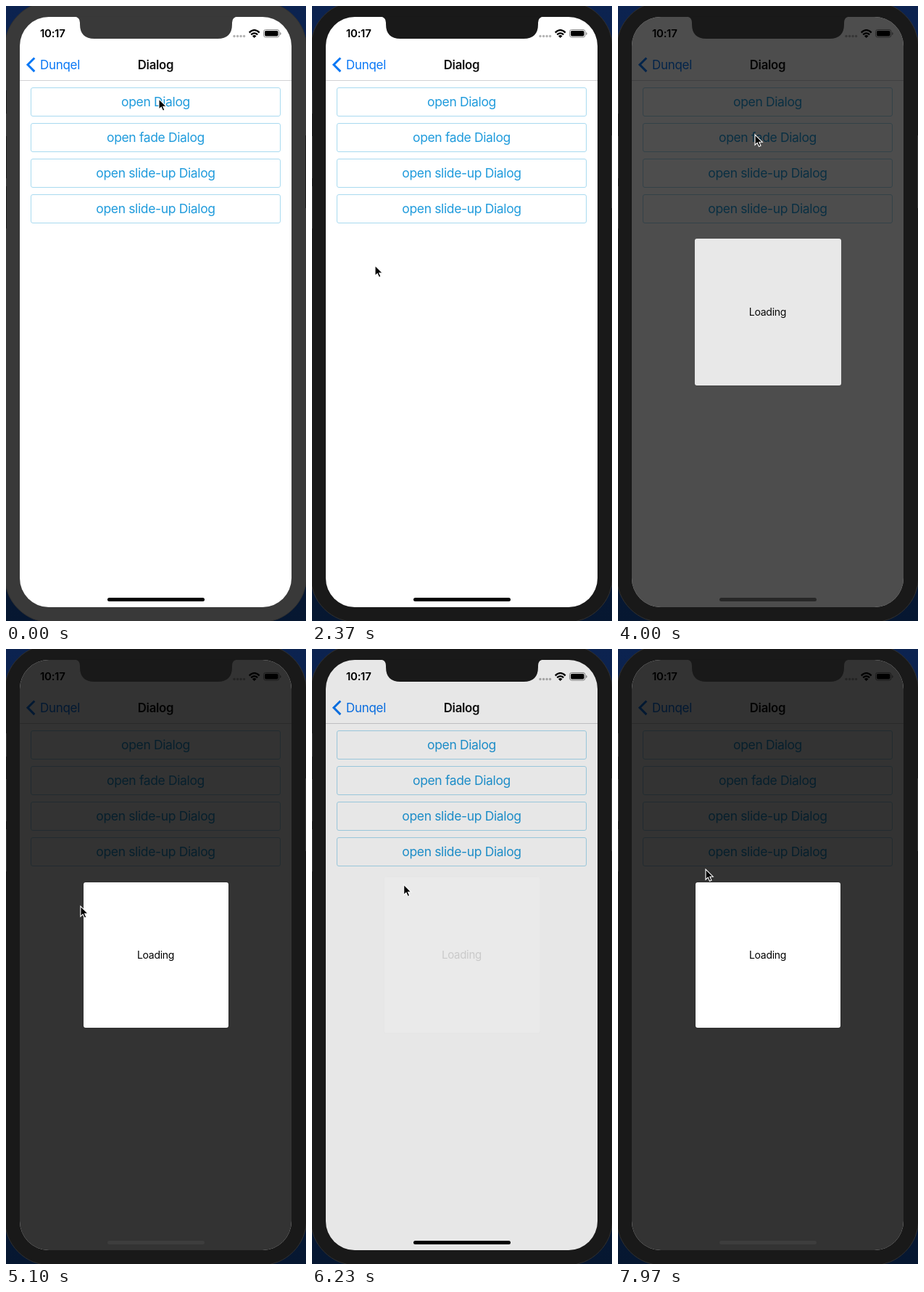
These frames come from a looping animation (414x846 px, 8 s). An HTML page:

```html
<!DOCTYPE html>
<html lang="en">
<head>
<meta charset="utf-8">
<title>Dialog demo</title>
<style>
  html, body { margin: 0; width: 100%; height: 100%; overflow: hidden; background: #0a1c40; }
  svg { display: block; width: 414px; height: 846px; }
  text { font-family: Inter, "Open Sans", sans-serif; letter-spacing: -.3px; }
  .middle { text-anchor: middle; }
  .bold { font-weight: 600; }
  #buttons rect { fill: #fff; stroke: #a9daf0; }
  #buttons text { fill: #1f9bdc; font-size: 17.5px; letter-spacing: -.36px; }
</style>
</head>
<body>
<svg viewBox="0 0 414 846">
  <defs>
    <linearGradient id="desk" x2="0" y2="1">
      <stop stop-color="#0c2350"/><stop offset="1" stop-color="#061731"/>
    </linearGradient>
    <clipPath id="screen"><rect x="19" y="15" width="375" height="812" rx="40"/></clipPath>
  </defs>
  <rect width="414" height="846" fill="url(#desk)"/>
  <rect id="bezel" x="-2" y="-6" width="417" height="854" rx="64" stroke="#303030"/>
  <path id="keys" d="M.5 116V148M.5 179V237M.5 248V306M413.5 178V278"/>

  <g clip-path="url(#screen)">
    <rect x="19" y="15" width="375" height="812" fill="#fff"/>
    <text class="bold" x="47" y="43" font-size="15">10:17</text>
    <g fill="#b4b4b4">
      <circle cx="315" cy="41.5" r="1.7"/><circle cx="319.6" cy="41.5" r="1.7"/>
      <circle cx="324.1" cy="41.5" r="1.7"/><circle cx="328.6" cy="41.5" r="1.7"/>
    </g>
    <g fill="none" stroke="#000" stroke-width="2.2">
      <path d="M335.7 36.6Q342.7 29.8 349.7 36.6M338.2 39.4Q342.7 35.2 347.2 39.4"/>
    </g>
    <path d="M342.7 44L339.9 41.2Q342.7 38.8 345.5 41.2Z"/>
    <rect x="355.5" y="32.5" width="21.5" height="10.5" rx="3" fill="none" stroke="#888"/>
    <rect x="357" y="34" width="18.5" height="7.5" rx="1.7"/>
    <path d="M378.2 36v4q1.5-.5 1.5-2t-1.5-2" fill="#888"/>

    <path d="M39.3 71.5L30 80.8L39.3 90.1" fill="none" stroke="#0a78f5" stroke-width="3"/>
    <text x="47" y="87" font-size="17" fill="#0a78f5">Dunqel</text>
    <text class="middle bold" x="206.5" y="87" font-size="16.8" fill="#111">Dialog</text>
    <path d="M19 102.5H394" stroke="#d2d2d4"/>
    <g id="buttons"></g>

    <rect id="mask" x="19" y="15" width="375" height="812"/>
    <g id="dialog">
      <rect x="106" y="320.5" width="202" height="202" rx="4" opacity=".06"/>
      <rect x="107" y="321" width="200" height="200" rx="3" fill="#fff"/>
      <text class="middle" x="206.5" y="426" font-size="14">Loading</text>
    </g>
    <rect id="home" x="140" y="814" width="134" height="5" rx="2.5"/>
  </g>

  <path id="notch" d="M94 14.5Q102 15 102 23V25Q102 45 122 45H292Q312 45 312 25V23Q312 15 320 14.5Z"/>
  <path id="cursor" d="M0 0V14.2L3.2 11.2L5.5 16.3L8 15.2L5.8 10.2H10.2Z" stroke="#fff" stroke-width="1.1"/>
</svg>
<script>
const $ = id => document.getElementById(id);
const set = (id, attrs) => {
  for (const name in attrs) $(id).setAttribute(name, attrs[name]);
};
const clamp = v => Math.min(1, Math.max(0, v));

const LOOP = 8000, FADE = 700, MASK_OPACITY = .8, FOCUS_TIME = 300;

const dialogs = [
  { kind: 'plain', open: 560, close: 1600 },
  { kind: 'fade', open: 3390, close: 5615 },
  { kind: 'slide', open: 6800, close: Infinity }
];

// Pointer stops: arrival time, departure time, x, y
const stops = [
  [0, 1150, 211, 128],
  [1600, 2550, 87, 357],
  [3250, 4500, 189, 177],
  [5250, 6000, 93, 374],
  [6600, 7420, 195, 223],
  [7900, LOOP, 121, 303]
];

$('buttons').innerHTML = ['open Dialog', 'open fade Dialog', 'open slide-up Dialog', 'open slide-up Dialog']
  .map((label, i) => `<g transform="translate(0 ${i * 49})">
    <rect x="34.5" y="112.5" width="344" height="39" rx="2.5"/>
    <text class="middle" x="206.5" y="138.3">${label}</text></g>`).join('');

function pointerAt(t) {
  const next = stops.findIndex(([arrive]) => arrive > t);
  if (next < 0) return stops.at(-1).slice(2);
  const [, leave, x, y] = stops[next - 1], [arrive, , toX, toY] = stops[next];
  const p = clamp((t - leave) / (arrive - leave)), k = p * p * (3 - 2 * p);
  return [x + (toX - x) * k, y + (toY - y) * k];
}

function drawDialog(t) {
  const current = dialogs.findLast(d => t >= d.open);
  let shown = 0, opacity = 0, scale = 1, drop = 0;
  if (current) {
    const { kind, open, close } = current;
    shown = Math.min(clamp((t - open) / FADE), 1 - clamp((t - close) / FADE));
    if (kind === 'plain') opacity = t < close ? 1 : 0;
    if (kind === 'fade') {
      opacity = shown;
      scale = 1 + .083 * (1 - shown);
    }
    if (kind === 'slide') {
      opacity = 1;
      drop = 506 * (1 - shown) ** 1.65;
    }
  }
  const dim = shown * MASK_OPACITY;
  set('mask', { opacity: dim });
  set('dialog', {
    opacity,
    transform: `translate(207 ${421 + drop}) scale(${scale}) translate(-207 -421)`
  });
  // The home bar lightens once the backdrop gets dark
  const grey = Math.round(Math.min(61, Math.max(0, (dim - .58) * 330)));
  set('home', { fill: `rgb(${grey},${grey},${grey})` });
}

function draw(t) {
  const focused = t >= FOCUS_TIME;
  const body = focused ? '#191919' : '#393939';
  set('bezel', { fill: body });
  set('notch', { fill: body });
  set('keys', { stroke: focused ? '#343434' : '#1c1c1c' });
  drawDialog(t);
  set('cursor', { transform: `translate(${pointerAt(t)})` });
}

const start = performance.now();
function tick() {
  draw((performance.now() - start) % LOOP);
  requestAnimationFrame(tick);
}
tick();
</script>
</body>
</html>
```
